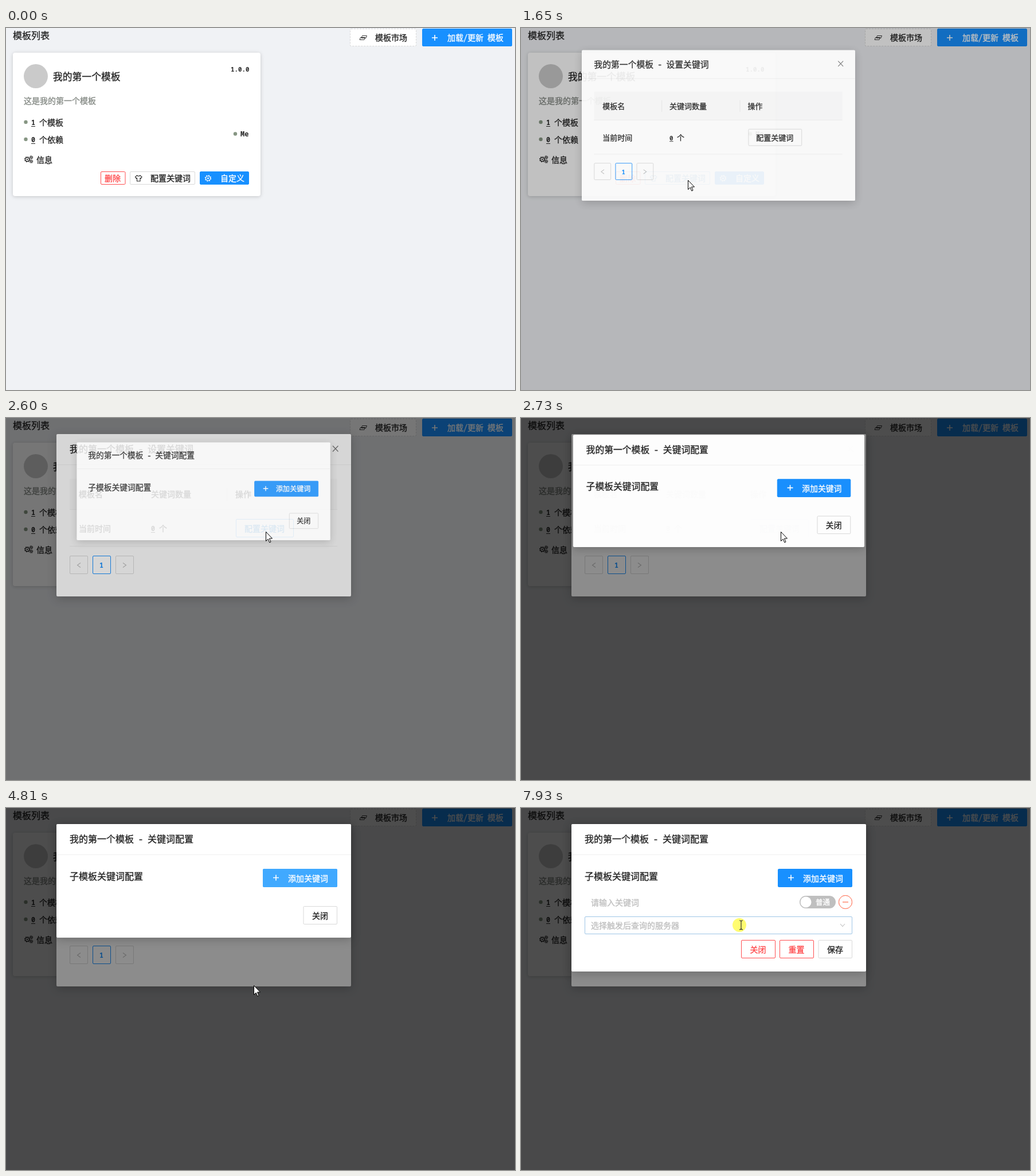
These frames come from a looping animation (888 by 631 pixels, 8000 ms). An HTML page:

```html
<!DOCTYPE html>
<html lang="zh-CN">
<head>
<meta charset="utf-8">
<title>模板列表</title>
<style>
  html, body { margin: 0; width: 100%; height: 100%; overflow: hidden; background: #f0f2f5; }
  svg { display: block; width: 888px; height: 631px; }
  text { font-family: "Noto Sans Mono CJK SC", "Noto Sans CJK SC", "Noto Sans CJK", "Noto Sans Mono", monospace; white-space: pre; stroke-width: .35; }
  .latin { font-family: "Noto Sans Mono", "DejaVu Sans Mono", monospace; font-weight: 600; stroke-width: 0; }
  .card { filter: drop-shadow(0 1px 3px rgba(0, 0, 0, .18)); }
  .dialog { filter: drop-shadow(0 4px 8px rgba(0, 0, 0, .2)); }
</style>
</head>
<body>
<svg id="stage" viewBox="0 0 888 631" xmlns="http://www.w3.org/2000/svg"></svg>
<script>
const LOOP = 8000;
const INK = '#262626', BLUE = '#1890ff', LIGHT = '#40a9ff', RED = '#ff4d4f', LINE = '#d9d9d9', HINT = '#bfbfbf';

// --- drawing helpers ---
const text = (x, cy, str, size = 14, fill = INK, extra = '') =>
  `<text x="${x}" y="${cy + size * .37}" font-size="${size}" fill="${fill}" stroke="${fill}" ${extra}>${str}</text>`;
const latin = (x, cy, str, size = 11.7, fill = INK) => text(x, cy, str, size, fill, 'class="latin"');
const rect = (x, y, w, h, fill, extra = '') =>
  `<rect x="${x}" y="${y}" width="${w}" height="${h}" fill="${fill}" ${extra}/>`;
const path = (d, stroke = INK, width = 1.2, fill = 'none', extra = '') =>
  `<path d="${d}" stroke="${stroke}" stroke-width="${width}" fill="${fill}" ${extra}/>`;
const dot = (x, y, r, fill, extra = '') => `<circle cx="${x}" cy="${y}" r="${r}" fill="${fill}" ${extra}/>`;
const group = (id, body, extra = '') => `<g id="${id}" ${extra}>${body}</g>`;
const button = (x, y, w, h, label, tx, color = INK, border = LINE, fill = '#fff', extra = '') =>
  rect(x + .5, y + .5, w - 1, h - 1, fill, `rx="1.5" stroke="${border}" ${extra}`) +
  text(tx, y + h / 2 + .5, label, 14, color);
const plus = (x, y) => path(`M${x - 5} ${y}h10M${x} ${y - 5}v10`, '#fff', 1.6);
const gear = (x, y, r, color, width = 1.3) =>
  dot(x, y, r, 'none', `stroke="${color}" stroke-width="${width}"`) +
  dot(x, y, r + 1, 'none', `stroke="${color}" stroke-width="1.4" stroke-dasharray="${(r + 1) * Math.PI / 8}"`) +
  dot(x, y, r * .35, color);
const counted = (x, cy, n, unit) =>
  latin(x, cy, n) + path(`M${x} ${cy + 6.5}h7`, INK, 1) + text(x + 14, cy, unit);

// --- page ---
const shirt = color => path('M228.500 257L225.500 259.500L227 262L228.500 261.500V267H234V261.500L235.500 262L237 259.500L234 257Q231.200 259.500 228.500 257Z', color, 1.1);
const setup = color => button(216, 250, 114, 23, '配置关键词', 252, color, color === INK ? LINE : color) + shirt(color);

const page =
  rect(0, 0, 888, 631, '#f0f2f5') +
  text(12, 13.5, '模板列表', 16) +
  button(600, 1, 116, 31, '模板市场', 644, INK, LINE, '#fff', 'stroke-dasharray="3 2"') +
  path('M621.500 13.500h8l-1.500 4h-8zM618.500 16.500h8l-1.500 4h-8z', INK, .9) +
  button(726, 1, 157, 31, '加载/更新 模板', 770, '#fff', BLUE, BLUE) + plus(748, 17) +
  rect(12, 43, 432, 250, '#fff', 'rx="4" class="card"') +
  dot(52, 84, 21, '#cacaca') +
  text(82, 84.5, '我的第一个模板', 16.8) +
  latin(392, 72.5, '1.0.0', 10.8) +
  text(31, 126.5, '这是我的第一个模板', 14, '#868b86') +
  dot(34.5, 164, 3.2, '#869683') + counted(44, 165, 1, '个模板') +
  dot(34.5, 194, 3.2, '#869683') + counted(44, 195, 0, '个依赖') +
  dot(400, 184.5, 3.2, '#869683') + latin(409, 185, 'Me', 12) +
  gear(37, 229, 3.4, INK) + gear(44, 225.5, 1.6, INK, 1) + gear(44, 232.500, 1.6, INK, 1) +
  text(53, 230, '信息') +
  button(165, 250, 43.500, 23, '删除', 172, RED, RED) +
  setup(INK) + group('setupHover', setup(LIGHT)) +
  button(338, 250, 86, 23, '自定义', 374, '#fff', BLUE, BLUE) + gear(352.500, 262, 4, '#fff', 1);

// --- first dialog ---
const rowButton = (color, border) => button(401, 176, 101, 32, '配置关键词', 416, color, border);
const heading = name => text(111, 54.5, `我的第一个模板 - ${name}`, 16) + rect(88, 81, 514, 1, '#f0f0f0');

const first =
  rect(88, 28, 514, 283, '#fff', 'rx="2" class="dialog"') + heading('设置关键词') +
  path('M570 48.500l9.500 10M579.500 48.500l-9.500 10', '#777', 1.2) +
  rect(111, 106, 467, 54, '#fafafa') + rect(111, 159, 467, 1, '#f0f0f0') +
  rect(238, 122, 1, 22, '#e8e8e8') + rect(385, 122, 1, 22, '#e8e8e8') +
  text(127, 133, '模板名') + text(253, 133, '关键词数量') + text(400, 133, '操作') +
  text(127, 193, '当前时间') + counted(253, 193, 0, '个') +
  rowButton(INK, LINE) + group('rowHover', rowButton(LIGHT, LIGHT)) +
  rect(111, 223, 467, 1, '#f0f0f0') +
  [111, 151, 191].map(x => rect(x + .5, 240.500, 31, 31, '#fff', `rx="1.5" stroke="${x === 151 ? BLUE : LINE}"`)).join('') +
  path('M130 252.500l-5.500 4l5.500 4M204 252.500l5.500 4l-5.500 4', HINT, 1.1) +
  latin(163, 256.5, 1, 11.7, BLUE);

// --- second dialog ---
const addButton = fill => button(448, 106, 130, 32, '添加关键词', 492, '#fff', fill, fill) + plus(471, 121.5);
const minus = color => dot(566, 164, 11.500, '#fff', `stroke="${color}"`) + path('M561 164h10', color, 1.3);
const select = border => rect(111.500, 189.500, 466, 30, '#fff', `rx="1.5" stroke="${border}"`) +
  text(122, 205, '选择触发后查询的服务器', 14, HINT) + path('M557 202l4 4.500l4 -4.500', HINT, 1.1);
const entry = i => group('entry' + i,
  text(122, 164.5, '请输入关键词', 14, HINT) +
  group('halo' + i, rect(482, 149, 71, 30, '#e6f2fc', 'rx="15"')) +
  rect(486, 153, 63, 22, HINT, 'rx="11"') + dot(497, 164, 9.500, '#fff') + text(514, 164.5, '普通', 12.5, '#fff') +
  minus(RED) + (i ? '' : group('minusHover', minus('#ff7858'))) +
  select(LINE) + (i ? '' : group('selectHover', select(LIGHT))),
  `transform="translate(0 ${i * 81})"`);

const second =
  rect(88, 28, 514, 198, '#fff', 'rx="2" class="dialog" id="panel"') + heading('关键词配置') +
  text(111, 119, '子模板关键词配置', 16) +
  group('wave', rect(446, 104, 134, 36, 'none', `rx="3" stroke="${BLUE}" stroke-width="4"`)) +
  addButton(BLUE) + group('addHover', addButton(LIGHT)) +
  entry(0) + entry(1) +
  group('closeOnly', button(518.500, 171, 59.500, 32, '关闭', 534)) +
  group('actions', button(384, 230, 60, 32, '关闭', 399.5, RED, RED) +
    button(451, 230, 60, 32, '重置', 466.5, RED, RED) + button(518.500, 230, 59.500, 32, '保存', 534));

const cursors =
  dot(0, 0, 12, '#fffb4d', 'id="press" opacity=".8"') +
  group('arrow', path('M.5 .5V16.500L4.200 13L6.800 19L9 18L6.500 12H11.500Z', '#000', 1, '#fff')) +
  group('hand', path('M-1.500 1.500Q0 -.5 1.500 1.500V7Q3 6 4.500 7.500Q6 6.800 7.200 8.300Q9.500 8 9.500 10V14Q9.500 16 7.500 19H0Q-1 16.500 -5 12Q-5 9.800 -1.500 12Z', '#000', 1, '#fff')) +
  group('beam', path('M0 -8q3 0 3 2v12q0 2 -3 2M6 -8q-3 0 -3 2M6 8q-3 0 -3 -2', '#333', 1.2));

const stage = document.getElementById('stage');
stage.innerHTML = page +
  rect(0, 0, 888, 631, '#000', 'id="mask1"') + group('first', first) +
  rect(0, 0, 888, 631, '#000', 'id="mask2"') + group('second', second) + group('cursor', cursors);

// --- timing ---
const el = {};
stage.querySelectorAll('[id]').forEach(node => el[node.id] = node);
const clamp = v => Math.max(0, Math.min(1, v));
const ramp = (t, start, span = 300) => clamp((t - start) / span);
const pulse = (t, on, off) => ramp(t, on) - ramp(t, off);
const show = (id, on) => el[id].setAttribute('display', on ? 'inline' : 'none');
const fade = (id, v) => el[id].setAttribute('opacity', v);

// cubic-bezier(.08, .82, .17, 1), solved by bisection
function circOut(x) {
  if (x <= 0 || x >= 1) return clamp(x);
  const curve = (s, a, b) => 3 * (1 - s) ** 2 * s * a + 3 * (1 - s) * s * s * b + s ** 3;
  let lo = 0, hi = 1;
  for (let i = 0; i < 24; i++) {
    const mid = (lo + hi) / 2;
    if (curve(mid, .08, .17) < x) lo = mid; else hi = mid;
  }
  return curve(lo, .82, 1);
}

// time, x, y of the pointer
const track = [
  [340, 766, 640], [1120, 291, 265], [1860, 291, 265], [2350, 453, 198], [3070, 453, 198],
  [3500, 530, 128], [3840, 540, 130], [4050, 437, 146], [4190, 437, 146], [4380, 500, 126],
  [4500, 500, 126], [4810, 432, 309], [4950, 438, 352], [5340, 614, 574], [5780, 525, 124],
  [5900, 528, 122], [6230, 528, 122], [6430, 542, 216], [6780, 565, 165], [7120, 565, 165], [7820, 381, 204]
];
const kinds = [
  [0, 'arrow'], [1050, 'hand'], [1570, 'arrow'], [2240, 'hand'], [2550, 'arrow'], [3320, 'hand'],
  [3960, 'arrow'], [4260, 'hand'], [4560, 'arrow'], [5690, 'hand'], [6270, 'arrow'], [6370, 'beam'],
  [6560, 'arrow'], [6640, 'hand'], [7330, 'arrow'], [7600, 'beam']
];
const presses = [[1380, 1510], [2400, 2520], [3580, 3700], [4400, 4490], [6160, 6250], [6900, 7010], [7850, 8000]];

function pointer(t) {
  let i = track.findIndex(k => k[0] > t);
  if (i < 0) i = track.length;
  const a = track[Math.max(0, i - 1)], b = track[Math.min(i, track.length - 1)];
  const p = a === b ? 0 : (t - a[0]) / (b[0] - a[0]), e = p * p * (3 - 2 * p);
  return [a[1] + (b[1] - a[1]) * e, a[2] + (b[2] - a[2]) * e];
}

function open(t, start, id, mask, ox, oy) {
  const p = circOut(ramp(t, start)), s = .2 + .8 * p;
  show(id, t >= start);
  fade(id, p);
  el[id].setAttribute('transform', `translate(${ox * (1 - s)} ${oy * (1 - s)}) scale(${s})`);
  fade(mask, .45 * ramp(t, start, 200));
}

function draw(t) {
  open(t, 1543, 'first', 'mask1', 338, 174);
  open(t, 2530, 'second', 'mask2', 342, 132);

  fade('setupHover', pulse(t, 1050, 1570));
  fade('rowHover', pulse(t, 2240, 2550));
  fade('addHover', pulse(t, 3320, 6920));
  fade('minusHover', ramp(t, 6640));
  fade('selectHover', ramp(t, 7780, 400));
  fade('wave', t > 3640 && t < 3900 ? .25 * (1 - ramp(t, 3640, 260)) : 0);

  const rows = t < 6250 ? 0 : t < 7020 ? 2 : 1;
  el.panel.setAttribute('height', rows ? 176 + 81 * rows : 198);
  for (let i = 0; i < 2; i++) {
    show('entry' + i, i < rows);
    fade('halo' + i, 1 - ramp(t, 6450));
  }
  show('closeOnly', !rows);
  show('actions', rows);
  el.actions.setAttribute('transform', `translate(0 ${81 * (rows - 1)})`);

  const [x, y] = pointer(t);
  const kind = kinds.filter(k => k[0] <= t).pop()[1];
  show('cursor', t >= 340);
  el.cursor.setAttribute('transform', `translate(${x} ${y})`);
  ['arrow', 'hand', 'beam'].forEach(k => show(k, k === kind));
  show('press', presses.some(([from, to]) => t >= from && t < to));
}

const begin = performance.now();
function tick() {
  draw((performance.now() - begin) % LOOP);
  requestAnimationFrame(tick);
}
tick();
</script>
</body>
</html>
```
